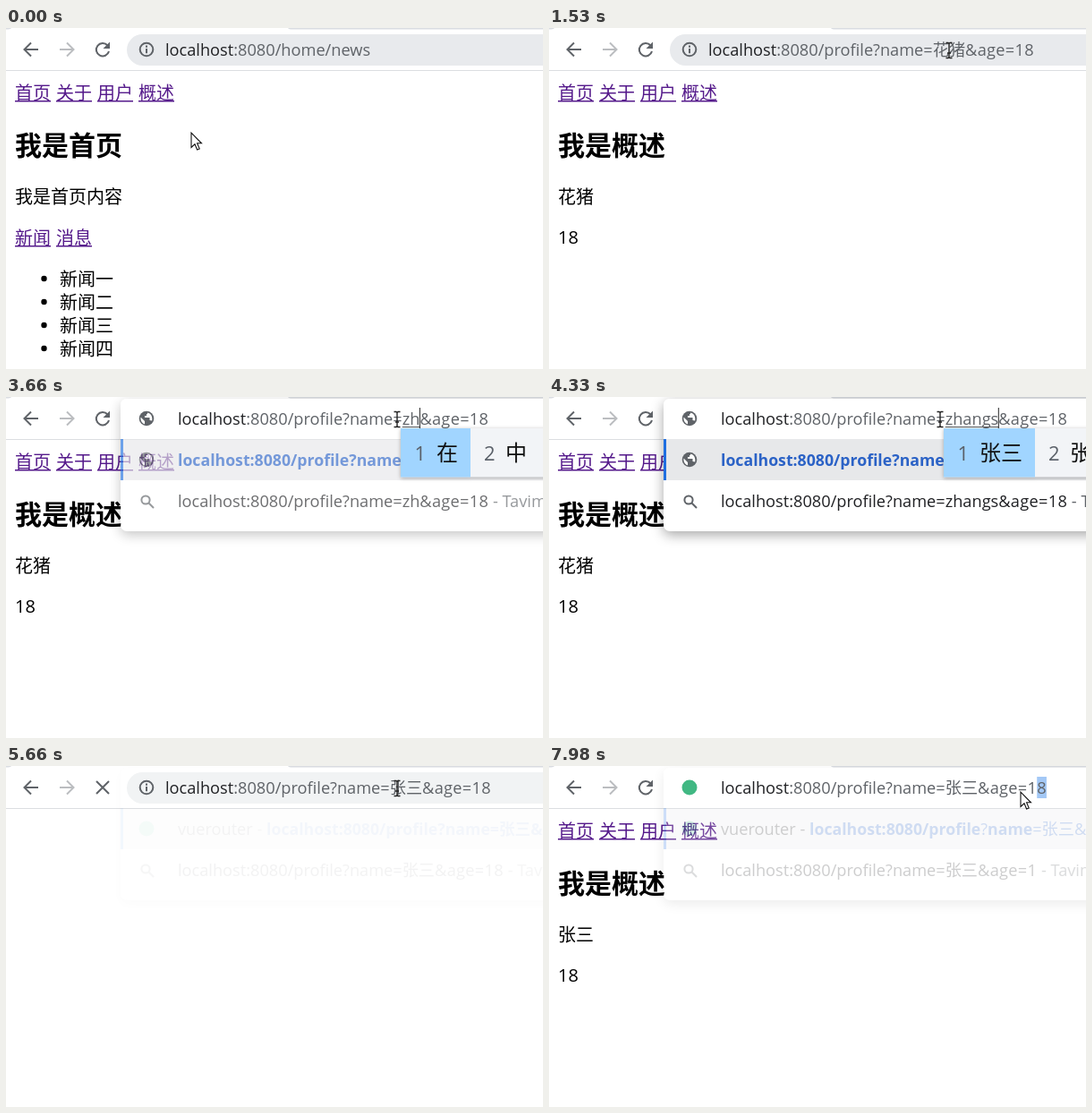
Write an HTML page that moves like this. It is 600x381 px and loops after 8 s.

```html
<!DOCTYPE html>
<html lang="zh-CN">
<head>
<meta charset="utf-8">
<title>Query parameters</title>
<style>
html, body { margin: 0; width: 100%; height: 100%; overflow: hidden; background: #fff; }
svg { display: block; width: 600px; height: 381px; }
text { font: 18.2px 'Open Sans', 'Noto Sans CJK SC', 'Noto Sans CJK', sans-serif; white-space: pre; fill: #5f6368; }
.page text { font-size: 20px; fill: #000; }
.page .h { font-size: 30px; font-weight: 700; }
.page .a { fill: #551a8b; }
.under { stroke: #551a8b; stroke-width: 1.5; }
.dark { fill: #202124; }
.bold { fill: #2b62c6; font-size: 17.7px; font-weight: 700; }
.blue { fill: #2b62c6; }
.tail { letter-spacing: .3px; }
.ime text { font-size: 24px; fill: #111; }
.ime .n { font-size: 22px; fill: #5a6069; }
.line { fill: none; stroke: #5f6368; stroke-width: 2; }
#panel rect:first-child { filter: drop-shadow(0 4px 7px rgba(0,0,0,.35)); }
.ime { filter: drop-shadow(0 1px 2px rgba(0,0,0,.3)); }
#press { mix-blend-mode: multiply; }
</style>
</head>
<body>
<svg viewBox="0 0 600 381">
  <defs>
    <g id="info"><circle r="7.3" class="line"/><path d="M0-1V4.2M0-4.4V-2.3" class="line"/></g>
    <g id="globe"><circle r="8.3" fill="#5f6368"/><path d="M-6.5-1.5L-2 3V6.3C-5 5.5-7 2.5-6.5-1.5ZM1-6.6C5-6 7 -2 6.2 2.5L3.5 2V-1H-2V-3H0V-5H1Z" fill="#fff"/></g>
    <g id="site"><circle r="8.5" fill="#41b883"/></g>
    <g id="arrow"><path d="M0 0V16.5L4 12.8L6.6 19L9.2 17.9L6.6 11.8H11.5Z" fill="#fff" stroke="#111" stroke-width="1.1"/></g>
    <g id="beam"><path d="M-3.5-8.5H-1L0-7.5L1-8.5H3.5M0-7.5V7.5M-3.5 8.5H-1L0 7.5L1 8.5H3.5M-2 3H2" fill="none" stroke="#222" stroke-width="1.4"/></g>
  </defs>

  <rect width="600" height="381" fill="#fff"/>
  <path d="M0 0H6Q5 1.5 0 1.5ZM315 0H600V1.5H320Q316 1.5 315 0Z" fill="#d9dce1"/>
  <path d="M0 47.5H600" stroke="#dcdee1"/>
  <path d="M36 24H21M28 16.5L20.5 24L28 31.5" class="line"/>
  <path d="M60 24H75M68 16.5L75.5 24L68 31.5" class="line" style="stroke:#bbbdc0"/>
  <g id="reload"><path d="M113.5 19.5A7.2 7.2 0 1 0 115 26" class="line"/><path d="M116 15.5V23H108.5Z" fill="#5f6368"/></g>
  <path id="stop" d="M101 17L115 31M115 17L101 31" class="line"/>

  <g class="page" id="page">
    <g id="nav"></g>
    <text class="h" id="title" x="10" y="142"></text>
    <text id="para" x="10" y="195.5"></text>
    <g id="home"></g>
    <text id="age" x="10" y="241">18</text>
  </g>

  <rect id="pill" x="135" y="7" width="500" height="35" rx="17.5"/>

  <g id="panel">
    <rect x="128" y="2" width="490" height="148" rx="7" fill="#fff"/>
    <path d="M128 47H600V93H128Z" fill="#e7e8ea"/>
    <path d="M128 47H131V93H128Z" fill="#1f6fe0"/>
    <use id="icon1" x="157" y="70"/>
    <text id="row1" x="192" y="77"></text>
    <circle cx="156" cy="115" r="4.6" class="line"/>
    <path d="M159.5 118.5L165 124" class="line"/>
    <text id="row2" x="192" y="123"></text>
  </g>
  <path id="head" d="M128 47V9Q128 2 135 2H600V47Z" fill="#fff"/>
  <use id="icon" x="157" y="24"/>
  <rect id="sel" y="12" height="24" fill="#a3c8f6"/>
  <text id="url" y="30.7"></text>
  <path id="under" stroke="#5f6368"/>
  <path id="caret" stroke="#222"/>

  <g class="ime" id="ime">
    <rect x="441" y="35" width="190" height="54.5" fill="#f2f4f7"/>
    <rect id="cell" x="441" y="35" height="54.5" fill="#a1d5ff"/>
    <text class="n" x="456.5" y="71">1</text>
    <text id="cand1" x="481" y="71"></text>
    <text class="n" id="two" y="71">2</text>
    <text id="cand2" y="71"></text>
  </g>

  <circle id="press" r="15.5" fill="#fdf382"/>
  <use id="cursor"/>
</svg>

<script>
const LOOP = 8000;
const $ = id => document.getElementById(id);
const NS = 'http://www.w3.org/2000/svg';
const HOST = 'localhost', PATH = ':8080/profile?name=';
const NAME_AT = 28;

function add(parent, tag, attrs, text = '') {
  const el = document.createElementNS(NS, tag);
  for (const k in attrs) el.setAttribute(k, attrs[k]);
  el.textContent = text;
  parent.append(el);
}
function spans(el, parts) {
  el.replaceChildren();
  for (const [text, cls = ''] of parts) add(el, 'tspan', { class: cls }, text);
}
function links(parent, words, y) {
  words.forEach((word, i) => {
    const x = 10 + 46 * i;
    add(parent, 'text', { class: 'a', x, y }, word);
    add(parent, 'path', { class: 'under', d: `M${x} ${y + 2.2}h40` });
  });
}
const show = (id, on) => $(id).style.display = on ? '' : 'none';

links($('nav'), ['首页', '关于', '用户', '概述'], 79.5);
links($('home'), ['新闻', '消息'], 241.5);
[...'一二三四'].forEach((n, i) => {
  add($('home'), 'circle', { cx: 42.5, cy: 280 + 26 * i, r: 3.2 });
  add($('home'), 'text', { x: 60, y: 287.5 + 26 * i }, '新闻' + n);
});

// Each step keeps the values of the one before it.
const steps = [
  [0, { page: 'home', pill: '#e8eaed', icon: 'info', pop: 0 }],
  [500, { page: '花猪', name: '花猪' }],
  [1930, { ring: true, caret: 30 }],
  [2110, { caret: null, sel: [29, 30] }],
  [2240, { sel: [28, 30] }],
  [3660, { sel: null, open: true, pop: .65, icon: 'globe', name: 'zh', cands: ['在', '中'], caret: 30 }],
  [3730, { pop: .85 }],
  [3860, { pop: 1 }],
  [4130, { name: 'zhang', cands: ['张', '章'], caret: 33 }],
  [4330, { name: 'zhangs', cands: ['张三', '张'], caret: 34 }],
  [4460, { name: 'zhangsan', cands: ['张三', '张'], caret: 36 }],
  [4860, { name: '张三', cands: null, icon: 'site', caret: 30 }],
  [5390, { caret: null }],
  [5590, { open: false, ring: false, pop: .4, icon: 'info', pill: '#f1f3f4', busy: true }],
  [5660, { page: '', pop: .05 }],
  [5720, { pop: 0 }],
  [5790, { page: '张三' }],
  [5860, { busy: false }],
  [6780, { ring: true, caret: 37 }],
  [6920, { caret: null, sel: [36, 37] }],
  [7050, { sel: [35, 37] }],
  [7980, { open: true, pop: .22, icon: 'site', sel: [36, 37], retyped: true }]
];
const path = [
  [0, 207, 117], [70, 207, 117], [400, 176, 76], [560, 172, 76], [870, 172, 24],
  [1530, 447, 25], [1790, 447, 25], [1930, 467, 26], [2310, 437, 26], [2580, 437, 25],
  [6190, 437, 25], [6700, 541, 25], [6850, 540, 25], [7050, 530, 27], [7320, 530, 27],
  [7380, 527, 29], [LOOP, 527, 29]
];
const presses = [[420, 560], [1930, 2580], [6780, 7320]];

function charX(i) {
  const el = $('url'), n = el.getNumberOfChars();
  return i < n ? el.getStartPositionOfChar(i).x : el.getEndPositionOfChar(n - 1).x;
}

function drawPage(s) {
  const home = s.page === 'home';
  show('page', s.page);
  show('home', home);
  show('age', !home);
  $('title').textContent = home ? '我是首页' : '我是概述';
  $('para').textContent = home ? '我是首页内容' : s.page;
}

function drawRows(s) {
  const full = HOST + PATH + s.name;
  $('panel').style.opacity = s.pop;
  $('icon1').setAttribute('href', s.cands ? '#globe' : '#site');
  let row;
  if (s.cands) row = [[full + '&age=18', 'bold']];
  else if (s.retyped) row = [['vuerouter - ', 'dark'], ['localhost:8080/profile', 'bold'], ['?', 'blue'], ['name', 'bold'], ['=张三&age=18', 'blue']];
  else row = [['vuerouter', 'dark'], [' - '], [full + '&age=18', 'bold']];
  spans($('row1'), row);
  spans($('row2'), [[full, 'dark'], [s.retyped ? '&age=1' : '&age=18', 'dark tail'], [' - Tavimo 搜索']]);
}

function drawBar(s) {
  const ring = s.ring && !s.open, pill = $('pill');
  pill.setAttribute('fill', ring ? '#fff' : s.pill);
  pill.setAttribute('stroke', ring ? '#3b82e6' : 'none');
  pill.setAttribute('stroke-width', 2.4);
  show('reload', !s.busy);
  show('stop', s.busy);
  show('head', s.open);
  $('icon').setAttribute('href', '#' + s.icon);
  $('url').setAttribute('x', s.open ? 192 : 178);
  spans($('url'), s.name
    ? [[HOST, 'dark'], [PATH + s.name], ['&age=18', 'tail']]
    : [[HOST, 'dark'], [':8080/home/news']]);

  show('sel', s.sel);
  if (s.sel) {
    const [a, b] = s.sel.map(charX);
    $('sel').setAttribute('x', a);
    $('sel').setAttribute('width', b - a);
  }
  show('caret', s.caret);
  if (s.caret) $('caret').setAttribute('d', `M${charX(s.caret)} 12V35`);
}

function drawIme(s) {
  show('ime', s.cands);
  show('under', s.cands);
  if (!s.cands) return;
  const [a, b] = s.cands, w = 54 + 24 * a.length;
  $('under').setAttribute('d', `M${charX(NAME_AT)} 33.5H${charX(NAME_AT + s.name.length)}`);
  $('cell').setAttribute('width', w);
  $('cand1').textContent = a;
  $('cand2').textContent = b;
  $('two').setAttribute('x', 441 + w + 15);
  $('cand2').setAttribute('x', 441 + w + 39);
}

function drawCursor(t) {
  const i = path.findIndex(p => p[0] > t);
  const [t0, x0, y0] = path[i - 1], [t1, x1, y1] = path[i];
  const u = (t - t0) / (t1 - t0), e = u * u * (3 - 2 * u);
  const x = x0 + (x1 - x0) * e, y = y0 + (y1 - y0) * e;
  const arrow = y > 46 || t >= 7380;
  $('cursor').setAttribute('href', arrow ? '#arrow' : '#beam');
  $('cursor').setAttribute('transform', `translate(${x} ${y})`);
  show('press', presses.some(([a, b]) => t >= a && t < b));
  $('press').setAttribute('transform', `translate(${x - 3} ${y + 1})`);
}

let last = -1;
function draw(t) {
  const past = steps.filter(s => s[0] <= t);
  if (past.length !== last) {
    last = past.length;
    const s = Object.assign({}, ...past.map(p => p[1]));
    drawPage(s);
    drawRows(s);
    drawBar(s);
    drawIme(s);
  }
  drawCursor(t);
}

const start = performance.now();
function tick() {
  draw((performance.now() - start) % LOOP);
  requestAnimationFrame(tick);
}
tick();
</script>
</body>
</html>
```
